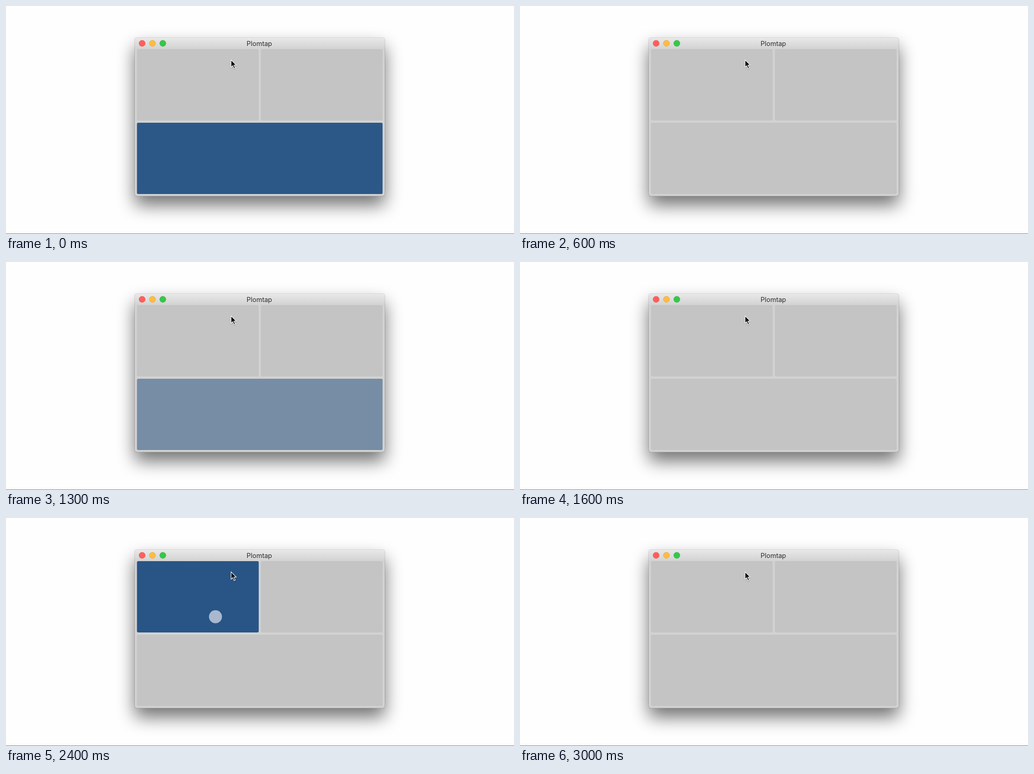
Recreate the animation shown at these times as an HTML page. Size 1116x502 px, loop 3.3 s.

```html
<!DOCTYPE html>
<html lang="en">
<head>
<meta charset="utf-8">
<title>Plomtap</title>
<style>
  html, body { margin: 0; width: 100%; height: 100%; overflow: hidden; background: #fff; }
  svg { display: block; width: 100%; height: 100%; }
  text { font: 14.5px Inter, Roboto, sans-serif; fill: #2c2c2c; text-anchor: middle; }
</style>
</head>
<body>
<svg viewBox="0 0 1116 502">
  <defs>
    <linearGradient id="bar" x1="0" y1="0" x2="0" y2="1">
      <stop offset="0" stop-color="#e9e9e9"/>
      <stop offset="1" stop-color="#d2d2d2"/>
    </linearGradient>
    <filter id="soft" x="-20%" y="-30%" width="140%" height="160%">
      <feGaussianBlur stdDeviation="19"/>
    </filter>
    <filter id="drop" x="-50%" y="-50%" width="200%" height="200%">
      <feDropShadow dx="0" dy="1" stdDeviation="1" flood-opacity=".35"/>
    </filter>
  </defs>

  <rect width="1116" height="502" fill="#fefefe"/>
  <rect y="501" width="1116" height="1" fill="#777"/>

  <rect x="283" y="89.5" width="549" height="349" rx="5" opacity=".55" filter="url(#soft)"/>
  <rect x="282.5" y="69" width="550" height="350" rx="5.5" opacity=".25"/>
  <rect x="283" y="69.5" width="549" height="349" rx="5" fill="#d2d2d2"/>
  <path d="M283 95V74.5a5 5 0 0 1 5-5H827a5 5 0 0 1 5 5V95Z" fill="url(#bar)"/>

  <g stroke-width=".6">
    <circle cx="299" cy="82.2" r="6.8" fill="#fc605b" stroke="#e2463f"/>
    <circle cx="321.7" cy="82.2" r="6.8" fill="#fdbc40" stroke="#dfa023"/>
    <circle cx="344.5" cy="82.2" r="6.8" fill="#34c84a" stroke="#1dad2b"/>
  </g>
  <text x="556.5" y="87.7">Plomtap</text>

  <g id="pads"></g>
  <circle id="touch" cx="460.2" cy="217.4" r="14.3" fill="#a9b8cf"/>
  <path d="M494.5 118.8V134.7L498.1 131.2L500.9 137.8L503.6 136.7L500.8 130.2H505.8Z"
        stroke="#fff" stroke-width="1.2" filter="url(#drop)"/>
</svg>

<script>
  const LOOP = 3300, STEP = 100, FADE = 200;
  const IDLE = [196, 196, 196], LIT = [40, 85, 134];
  const TOUCH_AT = 2400;
  const pads = [
    { x: 287.7, y: 95, w: 267.5, hits: [800, 2400, 2800] },
    { x: 559.8, y: 95, w: 267.5, hits: [] },
    { x: 287.7, y: 257, w: 539.6, hits: [-20, 400, 1200, 1400, 1800, 2200] }
  ];

  const group = document.getElementById('pads');
  const touch = document.getElementById('touch');

  for (const pad of pads) {
    pad.el = document.createElementNS('http://www.w3.org/2000/svg', 'rect');
    const box = { x: pad.x, y: pad.y, width: pad.w, height: 157, rx: 3 };
    for (const key in box) pad.el.setAttribute(key, box[key]);
    group.append(pad.el);
  }

  function glow(age) {
    return age < 0 || age >= FADE ? 0 : (1 + Math.cos(Math.PI * age / FADE)) / 2;
  }

  function mix(k) {
    return `rgb(${IDLE.map((c, i) => Math.round(c + (LIT[i] - c) * k))})`;
  }

  function draw(ms) {
    // The picture advances in steps of a tenth of a second.
    const t = Math.floor(ms % LOOP / STEP) * STEP;
    for (const pad of pads) {
      const level = Math.max(0, ...pad.hits.map(hit => glow(t - hit)));
      pad.el.setAttribute('fill', mix(level));
    }
    touch.setAttribute('visibility', t === TOUCH_AT ? 'visible' : 'hidden');
  }

  const start = performance.now();
  function tick() {
    draw(performance.now() - start);
    requestAnimationFrame(tick);
  }
  tick();
</script>
</body>
</html>
```
